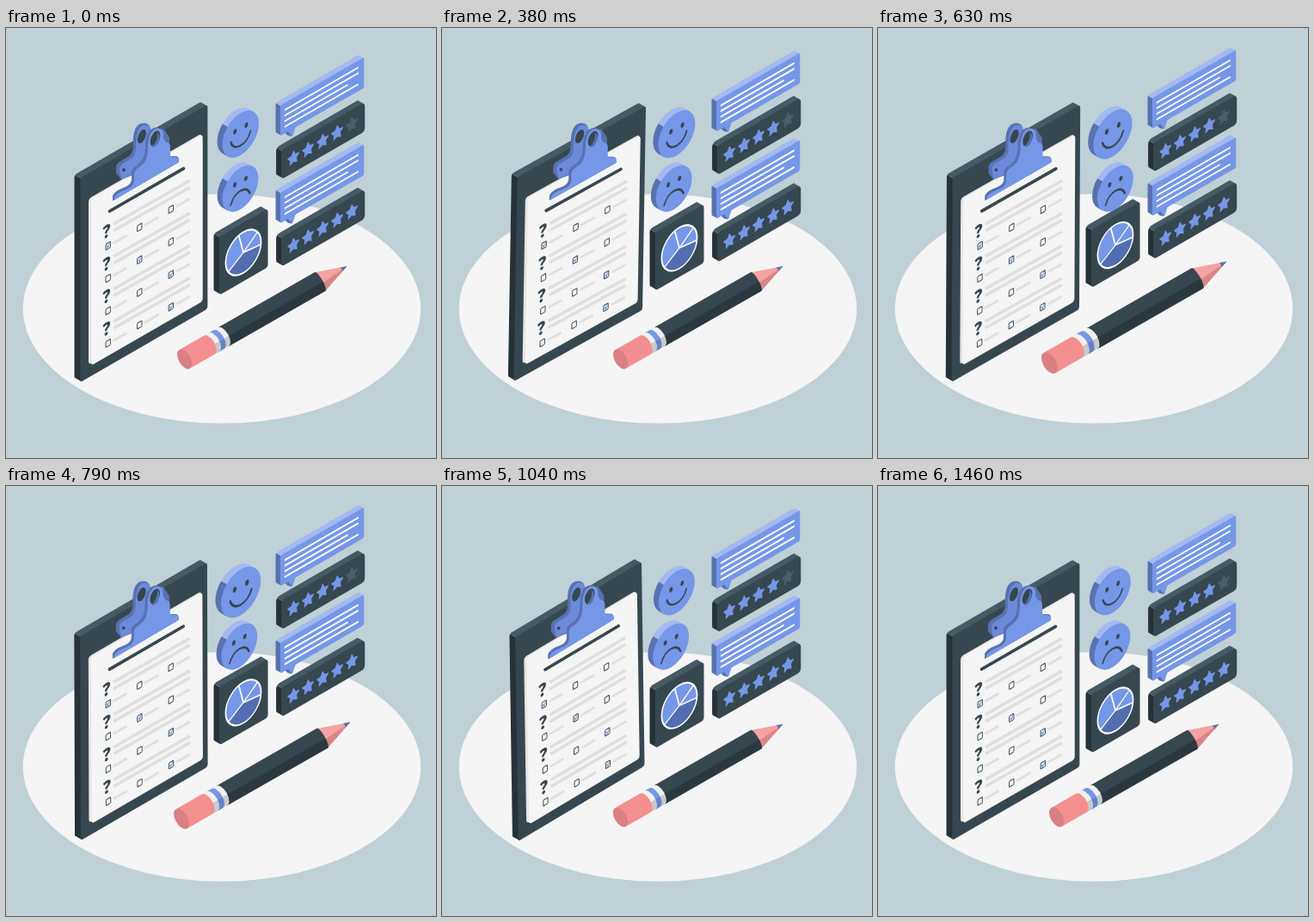
An HTML page that plays this animation: 500x500 px, repeating every 1500 ms.

```html
<!DOCTYPE html>
<html lang="en">
<head>
<meta charset="utf-8">
<title>Survey feedback</title>
<style>
html, body { margin: 0; width: 100%; height: 100%; overflow: hidden; background: #bfd0d7; }
svg { display: block; width: 100vw; height: 100vh; }
text { font: 800 20.5px "Open Sans", sans-serif; fill: #37474f; }
</style>
</head>
<body>
<svg id="stage" viewBox="0 0 500 500"></svg>
<script>
const BLUE = { face: '#7597e8', top: '#a3b9f0', side: '#5872b0' };
const DARK = { face: '#37474f', top: '#455a64', side: '#263238' };
const PAPER = '#f5f5f5';
const LOOP = 1500, FRAMES = 36;

const path = (d, fill, extra = '') => `<path d="${d}" fill="${fill}" ${extra}/>`;
const stroke = (d, color, width, extra = '') =>
  path(d, 'none', `stroke="${color}" stroke-width="${width}" ${extra}`);
const iso = (x, y, body) => `<g transform="matrix(.866 -.5 0 1 ${x} ${y})">${body}</g>`;
const group = (id, body) => `<g id="${id}">${body}</g>`;
const polar = (r, deg) => {
  const a = deg * Math.PI / 180;
  return [r * Math.cos(a), r * Math.sin(a)].map(v => v.toFixed(2)).join(' ');
};

// Rounded slab: front face at the local origin, thickness d towards the upper left.
function slab(w, h, d, r, c) {
  const k = r * .3;
  const left = `M${k - d} ${k - d}Q${-d} ${r * .6 - d} ${-d} ${r - d}V${h - r - d}`
    + `Q${-d} ${h - r * .4 - d} ${k - d} ${h - k - d}l${d} ${d}L${r} ${h - r}V${r}L${k} ${k}Z`;
  const top = `M${k - d} ${k - d}Q${r * .6 - d} ${-d} ${r - d} ${-d}H${w - r - d}`
    + `Q${w - r * .4 - d} ${-d} ${w - k - d} ${k - d}l${d} ${d}L${w - r} ${r}H${r}L${k} ${k}Z`;
  return path(left, c.side) + path(top, c.top)
    + `<rect width="${w}" height="${h}" rx="${r}" fill="${c.face}"/>`;
}

function bubble(y) {
  let s = path('M8 34L4 32L10 40L16 44L12 34Z', BLUE.side);
  s += slab(112.3, 35.5, 6.3, 2, BLUE) + path('M9.5 34L16.2 44L21 34Z', BLUE.face);
  [104, 104, 90, 104].forEach((end, i) => {
    s += stroke(`M6.5 ${8.2 + i * 6.5}H${end}`, '#fff', 2.1, 'stroke-linecap="round"');
  });
  return iso(319, y, s);
}

function star(x, y, fill) {
  const pts = [];
  for (let i = 0; i < 10; i++) pts.push(polar(i % 2 ? 3.9 : 7.7, i * 36 - 90));
  return `<polygon transform="translate(${x} ${y})" points="${pts.join(' ')}" fill="${fill}" `
    + `stroke="${fill}" stroke-width="1.4" stroke-linejoin="round"/>`;
}

function rating(y, score) {
  let s = slab(112.3, 34, 6.8, 4.5, DARK);
  for (let i = 0; i < 5; i++) s += star(16.4 + i * 19.6, 17, i < score ? BLUE.face : '#4b5d67');
  return iso(320, y, s);
}

function pieCard() {
  const R = 23.8;
  const slice = (a, b, fill) =>
    path(`M0 0L${polar(R, a)}A${R} ${R} 0 0 1 ${polar(R, b)}Z`, fill);
  const pie = `<circle r="${R}" fill="${BLUE.face}"/>` + slice(6, 148, '#536eb0');
  const rays = [6, 148, 255, 323].map(a => 'M0 0L' + polar(R, a)).join('');
  return iso(248, 242.7, slab(65.3, 68, 7.5, 3.5, DARK))
    + iso(276, 261, pie + stroke(rays, '#fff', 1.7)
      + `<circle r="${R}" fill="none" stroke="#fff" stroke-width="1.9"/>`);
}

function face(x, y, eyeY, mouth) {
  const R = 24.2, q = R * Math.SQRT1_2, d = 6.8;
  const lower = `M${-q} ${-q}l${-d} ${-d}A${R} ${R} 0 0 0 ${-q - d} ${q - d}l${d} ${d}Z`;
  const upper = `M${q} ${-q}l${-d} ${-d}A${R} ${R} 0 0 0 ${-q - d} ${-q - d}l${d} ${d}Z`;
  const eye = ex => `<ellipse cx="${ex}" cy="${eyeY}" rx="2.3" ry="2.9" fill="#37474f"/>`;
  return iso(x, y, path(lower, BLUE.side) + path(upper, BLUE.top)
    + `<circle r="${R}" fill="${BLUE.face}"/>` + eye(-7.5) + eye(7.5)
    + stroke(mouth, '#37474f', 2.3, 'stroke-linecap="round"'));
}

function checkbox(x, y, on) {
  return iso(x, y, `<rect x="-3.1" y="-3.4" width="6.2" height="6.8" rx="1" fill="${PAPER}" `
    + 'stroke="#37474f" stroke-width="1.1"/>'
    + (on ? stroke('M-1.8 -1L0 1.6L2 -2M-1.6 1.8L1.8 -1', BLUE.face, 1.2) : ''));
}

function row(i) {
  const y = i * 37.8;
  const bar = (x, y0, len, w) => stroke(`M${x} ${y0 + y}l${len} ${-len * .57}`, '#e0e0e0', w);
  let s = bar(125, 228, 89, 3.6) + bar(125, 235.8, 89, 3.6);
  s += bar(124.5, 250.3, 16, 2.8) + bar(161, 229.3, 16.5, 2.8) + bar(198, 207.7, 16, 2.8);
  const picked = [0, 1, 2, 2][i];
  [[118.7, 253.2], [155.3, 231.8], [191.8, 210.8]].forEach(([x, cy], n) => {
    s += checkbox(x, cy + y, n === picked);
  });
  return s + iso(112.6, 246.2 + y, '<text>?</text>');
}

function clip() {
  const hole = (x, y, rx, ry) =>
    `<ellipse cx="${x}" cy="${y}" rx="${rx}" ry="${ry}" transform="rotate(22 ${x} ${y})" fill="#37474f"/>`;
  const back = 'M128 162Q128 158 133 155L143 149Q148 145 148 136C147 123 150 113 157 111'
    + 'C164 109 168 113 168 119L183 117L190 127V134L150 170L134 176L128 169Z';
  const backFace = 'M132 164Q132 160 137 157L147 151Q151 147 151 138C151 124 154 115 160 113'
    + 'C166 112 168 115 168 121L164 144L150 168L134 176Z';
  const body = 'M124 201V195Q127 189 136 186Q145 183 146 177V167Q147 162 153 159'
    + 'Q162 153 162 138C162 125 166 117 173 116C179 115 183 119 183 125L190 131V149'
    + 'L198 149Q202 150 201 156Z';
  const front = 'M126 200V197Q130 191 139 188Q148 185 149 178V169Q150 164 156 161'
    + 'Q165 155 165 140C165 126 169 119 175 117C181 116 184 120 183 128L186 133Q191 133 191 138'
    + 'V147Q191 151 195 150Q202 149 201 156Z';
  return path(back, BLUE.side) + path(backFace, '#6b8ad9') + hole(158, 126, 4.2, 8.5)
    + '<circle cx="137" cy="165" r="1.9" fill="#37474f"/>'
    + path(body, BLUE.side) + path(front, BLUE.face)
    + hole(173.5, 128.5, 5, 9.5)
    + path('M176 121Q181 126 177 134Q173 140 170 138Q177 131 176 121Z', BLUE.side);
}

function board() {
  let s = iso(86.3, 174.6, slab(171, 237.5, 7.8, 3, DARK));
  s += iso(96, 198.4, '<rect width="152" height="193.4" rx="4" fill="#e6e6e6"/>');
  s += iso(99, 198.6, `<rect width="149.8" height="194" rx="3.5" fill="${PAPER}"/>`);
  s += stroke('M120.5 213L206.5 163.4', '#37474f', 3.6, 'stroke-linecap="round"');
  for (let i = 0; i < 4; i++) s += row(i);
  return s + clip();
}

function pencil() {
  const H = 12.5, E = 6.5;
  // Piece of the cylinder between two positions along the axis.
  const ring = (a, b, fill, bulge = E) => path(
    `M${a} ${-H}H${b}A${bulge} ${H} 0 0 1 ${b} ${H}H${a}A${E} ${H} 0 0 0 ${a} ${-H}Z`, fill);
  const shade = (a, b, fill, o, bulge = E) => path(
    `M${a + E} 2H${b + bulge}Q${b + bulge * .8} 10 ${b} ${H}H${a}Q${a + 5} 10 ${a + E} 2Z`,
    fill, `opacity="${o}"`);
  const s = path(`M181 ${-H}L217.5 0L181 ${H}Z`, '#f4a3a2')
    + path(`M183 3L217.5 0L181 ${H}Z`, '#dc8586')
    + path('M210 -2.6L217.5 0L210 2.6Q211 0 210 -2.6Z', '#5872b0')
    + ring(51.5, 181.5, '#37474f', 3) + shade(51.5, 181.5, '#2b3840', 1, 3)
    + ring(45.5, 51.5, '#f0f0f0') + ring(39, 45.5, BLUE.face) + ring(33, 39, '#f0f0f0')
    + shade(33, 51.5, '#263238', .2)
    + ring(0, 33, '#f48f8f')
    + `<ellipse rx="7" ry="${H}" fill="#da7f83"/>`;
  return `<g transform="translate(207.7 385) rotate(-29.8)">${s}</g>`;
}

const stage = document.getElementById('stage');
stage.innerHTML = '<rect width="500" height="500" fill="#bfd0d7"/>'
  + `<ellipse cx="251" cy="326.4" rx="231.2" ry="133.4" fill="${PAPER}"/>`
  + group('board', board())
  + group('pencil', pencil())
  + group('cards', pieCard() + rating(243.8, 5) + bubble(191.6) + rating(142.3, 4) + bubble(90.1))
  + group('smile', face(272.8, 123.3, -6.4, 'M-13 3C-9 16.5 9 16.5 13 3'))
  + group('frown', face(272.5, 186.7, -8, 'M-13 13C-8 -.5 8 -.5 13 12'));

// Piecewise linear curve through [position, value] pairs.
function track(keys, p) {
  let i = 1;
  while (i < keys.length - 1 && p > keys[i][0]) i++;
  const [a, u] = keys[i - 1], [b, v] = keys[i];
  return u + (v - u) * (p - a) / (b - a);
}

const SWAY = [[0, 0], [.25, 1], [.75, -1], [1, 0]];
const FLOAT = [[0, 0], [.5, -10], [1, 0]];
const SHAKE = [[0, 0], [.1, -2], [.2, 4], [.3, -8], [.4, 8], [.5, -8],
  [.6, 8], [.7, -8], [.8, 4], [.9, -2], [1, 0]];
const SWELL = [[0, 1.015], [.25, 1.025], [.55, 1.105], [.7, 1], [1, 1]];
const BEAT = [[0, 1], [.14, 1], [.3, 1.1], [.52, 1.1], [.7, 1], [1, 1]];

const move = (id, value) => document.getElementById(id).setAttribute('transform', value);
const zoom = (x, y, k) => `translate(${x} ${y}) scale(${k}) translate(${-x} ${-y})`;

function draw(ms) {
  // The motion runs at 24 steps per second.
  const n = Math.floor((ms % LOOP + 4) * FRAMES / LOOP) % FRAMES;
  const p = n / (FRAMES - 1);
  move('board', `rotate(${track(SWAY, p)} 157.5 248.5)`);
  move('cards', `translate(0 ${track(FLOAT, p)})`);
  move('frown', `translate(${track(SHAKE, p)} 0)`);
  move('smile', zoom(270, 121.5, track(SWELL, p)));
  move('pencil', zoom(297.7, 336.5, track(BEAT, p * 3 % 1)));
}

const start = performance.now();
function tick() {
  draw(performance.now() - start);
  requestAnimationFrame(tick);
}
draw(0);
requestAnimationFrame(tick);
</script>
</body>
</html>
```
